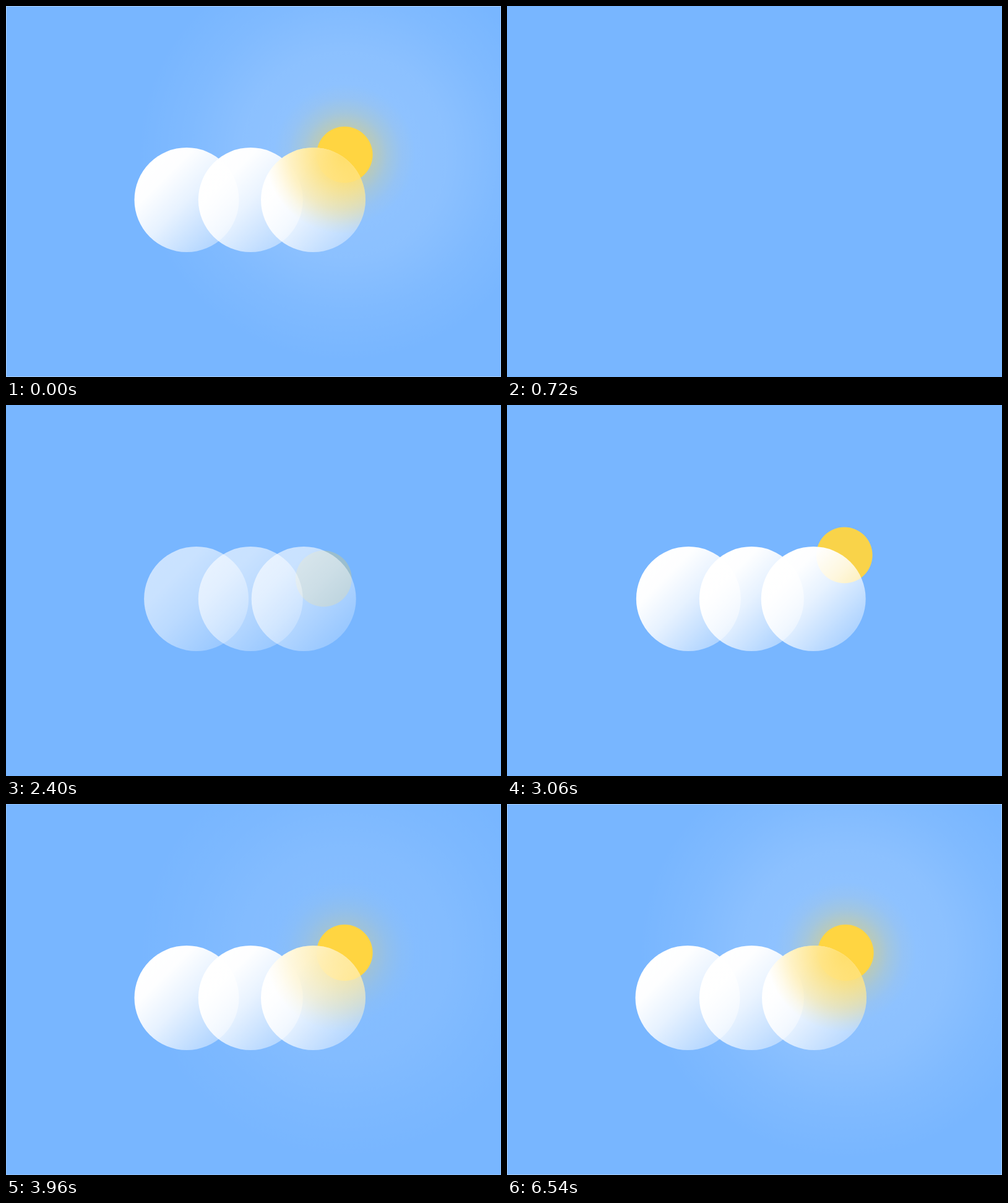
Animation, 800 px wide and 600 px high, one loop 6.72 s. Source, as an HTML page with a canvas:

```html
<!DOCTYPE html>
<html lang="en">
<head>
<meta charset="utf-8">
<title>Sun and clouds</title>
<style>
  html, body { margin: 0; width: 100%; height: 100%; overflow: hidden; background: #78b6ff; }
  canvas { display: block; }
</style>
</head>
<body>
<canvas id="stage" width="800" height="600"></canvas>
<script>
const ctx = document.getElementById('stage').getContext('2d');
const LOOP = 6720;
const FADE_END = 720;
const CLOUD_Y = 313.5, CLOUD_R = 84.5;
const SUN = { x: 547.2, y: 240.5, r: 45.4 };
const YELLOW = '255,213,65';
const WHITE = '255,255,255';

const ramp = (t, from, to) => Math.min(1, Math.max(0, (t - from) / (to - from)));
const mix = (a, b, k) => a + (b - a) * k;

// Cubic bezier easing, solved by bisection
function bezier(x1, y1, x2, y2) {
  const at = (a, b, s) => 3 * (1 - s) * (1 - s) * s * a + 3 * (1 - s) * s * s * b + s * s * s;
  return x => {
    if (x <= 0 || x >= 1) return x <= 0 ? 0 : 1;
    let lo = 0, hi = 1;
    for (let i = 0; i < 24; i++) {
      const mid = (lo + hi) / 2;
      if (at(x1, x2, mid) < x) lo = mid; else hi = mid;
    }
    return at(y1, y2, lo);
  };
}
const ease = bezier(0.33, 0, 0.05, 1);

function addStops(gradient, rgb, stops) {
  for (const [pos, alpha] of stops) gradient.addColorStop(pos, `rgba(${rgb},${alpha})`);
  return gradient;
}

function disc(x, y, r, fill, alpha) {
  ctx.globalAlpha = alpha;
  ctx.fillStyle = fill;
  ctx.beginPath();
  ctx.arc(x, y, r, 0, Math.PI * 2);
  ctx.fill();
}

function halo(r, rgb, stops) {
  return addStops(ctx.createRadialGradient(SUN.x, SUN.y, 0, SUN.x, SUN.y, r), rgb, stops);
}

const wideGlow = halo(335, WHITE, [[0, 0.19], [0.3, 0.17], [0.5, 0.145], [0.75, 0.06], [1, 0]]);
const nearGlow = halo(115, YELLOW, [[0, 0.5], [0.39, 0.37], [0.6, 0.17], [0.8, 0.05], [1, 0]]);
const cloudGlow = halo(128, YELLOW, [[0, 0.75], [0.35, 0.6], [0.7, 0.3], [0.88, 0.1], [1, 0]]);

function cloud(x, alpha) {
  const d = CLOUD_R * Math.SQRT1_2;
  const shade = addStops(
    ctx.createLinearGradient(x - d, CLOUD_Y - d, x + d, CLOUD_Y + d),
    WHITE, [[0, 1], [0.2, 0.99], [0.5, 0.82], [1, 0.4]]);
  disc(x, CLOUD_Y, CLOUD_R, shade, alpha);
}

function pose(t) {
  if (t < FADE_END) {
    const a = 1 - t / FADE_END;
    return { spread: 1, rise: 1, clouds: a, sun: a, glow: a };
  }
  return {
    spread: ease(ramp(t, 1410, 3410)),
    rise: ease(ramp(t, 2000, 3400)),
    clouds: ramp(t, 1380, 3060),
    sun: ramp(t, 2160, 3100),
    glow: ramp(t, 3100, 4600)
  };
}

function draw(t) {
  const p = pose(t);
  ctx.globalAlpha = 1;
  ctx.fillStyle = '#78b6ff';
  ctx.fillRect(0, 0, 800, 600);

  if (p.glow > 0) {
    disc(SUN.x, SUN.y, 335, wideGlow, p.glow);
    disc(SUN.x, SUN.y, 115, nearGlow, p.glow);
    ctx.globalAlpha = p.glow;
    ctx.strokeStyle = `rgba(${WHITE},0.35)`;
    ctx.lineWidth = 1;
    ctx.strokeRect(0.5, 0.5, 799, 599);
  }

  disc(mix(472, SUN.x, p.rise), mix(330, SUN.y, p.rise), SUN.r, `rgb(${YELLOW})`, p.sun);

  const right = mix(395.3, 496.5, p.spread);
  cloud(mix(395.3, 292, p.spread), p.clouds);
  cloud(395.3, p.clouds);
  cloud(right, p.clouds);
  if (p.glow > 0) disc(right, CLOUD_Y, CLOUD_R, cloudGlow, p.glow);
}

const start = performance.now();
function tick() {
  draw((performance.now() - start) % LOOP);
  requestAnimationFrame(tick);
}
tick();
</script>
</body>
</html>
```
